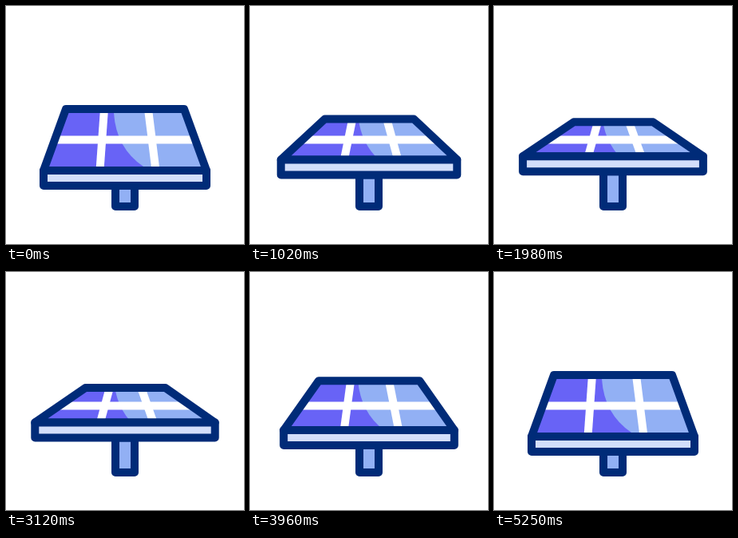
Animation, 298 px wide and 298 px high, one loop 5400 ms. Source, as an HTML page with a canvas:

```html
<!DOCTYPE html>
<html lang="en">
<head>
<meta charset="utf-8">
<title>Tilting solar panel</title>
<style>
  html, body { margin: 0; width: 100%; height: 100%; overflow: hidden; background: #fff; }
  canvas { display: block; width: 298px; height: 298px; }
</style>
</head>
<body>
<canvas id="stage"></canvas>
<script>
const SIZE = 298, LOOP = 5400, STEP = 30;
const NAVY = '#002b78', PURPLE = '#6863f6', BLUE = '#92b0f4', PALE = '#d3defb';
const canvas = document.getElementById('stage');
const ratio = window.devicePixelRatio || 1;
canvas.width = canvas.height = Math.round(SIZE * ratio);
const ctx = canvas.getContext('2d');
ctx.scale(ratio, ratio);

const mix = (a, b, p) => a + (b - a) * p;

function bezier(x1, y1, x2, y2) {
  const at = (a, b, s) => 3 * a * s * (1 - s) ** 2 + 3 * b * s * s * (1 - s) + s ** 3;
  return x => {
    if (x <= 0) return 0;
    if (x >= 1) return 1;
    let lo = 0, hi = 1;
    for (let i = 0; i < 24; i++) {
      const mid = (lo + hi) / 2;
      if (at(x1, x2, mid) < x) lo = mid; else hi = mid;
    }
    return at(y1, y2, lo);
  };
}

const tiltDown = bezier(0.25, 0.1, 0.25, 1);
const tiltBack = bezier(0.42, 0, 0.4, 1);
const tiltAt = t => tiltDown(t / 2250) - tiltBack((t - 2850) / 2400);

function path(points) {
  ctx.beginPath();
  points.forEach(([x, y]) => ctx.lineTo(x, y));
}

function outlined(points, fill) {
  path(points);
  ctx.closePath();
  if (fill) {
    ctx.fillStyle = fill;
    ctx.fill();
  }
  ctx.strokeStyle = NAVY;
  ctx.stroke();
}

const box = (l, t, r, b) => [[l, t], [r, t], [r, b], [l, b]];

function line(x1, y1, x2, y2) {
  path([[x1, y1], [x2, y2]]);
  ctx.strokeStyle = '#fff';
  ctx.stroke();
}

function draw(t) {
  const p = tiltAt(t);
  const v = (a, b) => mix(a, b, p);
  const top = v(129, 145.5), front = v(206, 188), base = v(225, 207);
  const left = v(47, 36), right = v(251, 262);
  const face = [[v(75, 100), top], [v(223, 199), top], [right, front], [left, front]];

  ctx.fillStyle = '#fff';
  ctx.fillRect(0, 0, SIZE, SIZE);
  ctx.lineWidth = 10;
  ctx.lineJoin = 'round';

  outlined(box(137, base, 161, 251), BLUE);

  ctx.save();
  path(face);
  ctx.clip();
  ctx.fillStyle = PURPLE;
  ctx.fillRect(0, 0, SIZE, SIZE);

  // The shine keeps its place while the panel tilts
  ctx.beginPath();
  ctx.moveTo(135, 120);
  ctx.lineTo(135, 134);
  ctx.quadraticCurveTo(138, 178, 172, 201);
  ctx.lineTo(182, 207);
  ctx.lineTo(SIZE, 207);
  ctx.lineTo(SIZE, 120);
  ctx.fillStyle = BLUE;
  ctx.fill();

  line(0, 167.5, SIZE, 167.5);
  line(v(123, 130), top, v(117.5, 118), front);
  line(v(178, 169), top, v(187.5, 184.5), front);
  ctx.restore();

  outlined(face);
  outlined(box(left, front, right, base), PALE);
}

const start = performance.now();
function tick() {
  const t = (performance.now() - start) % LOOP;
  draw(Math.floor(t / STEP) * STEP);
  requestAnimationFrame(tick);
}
tick();
</script>
</body>
</html>
```
